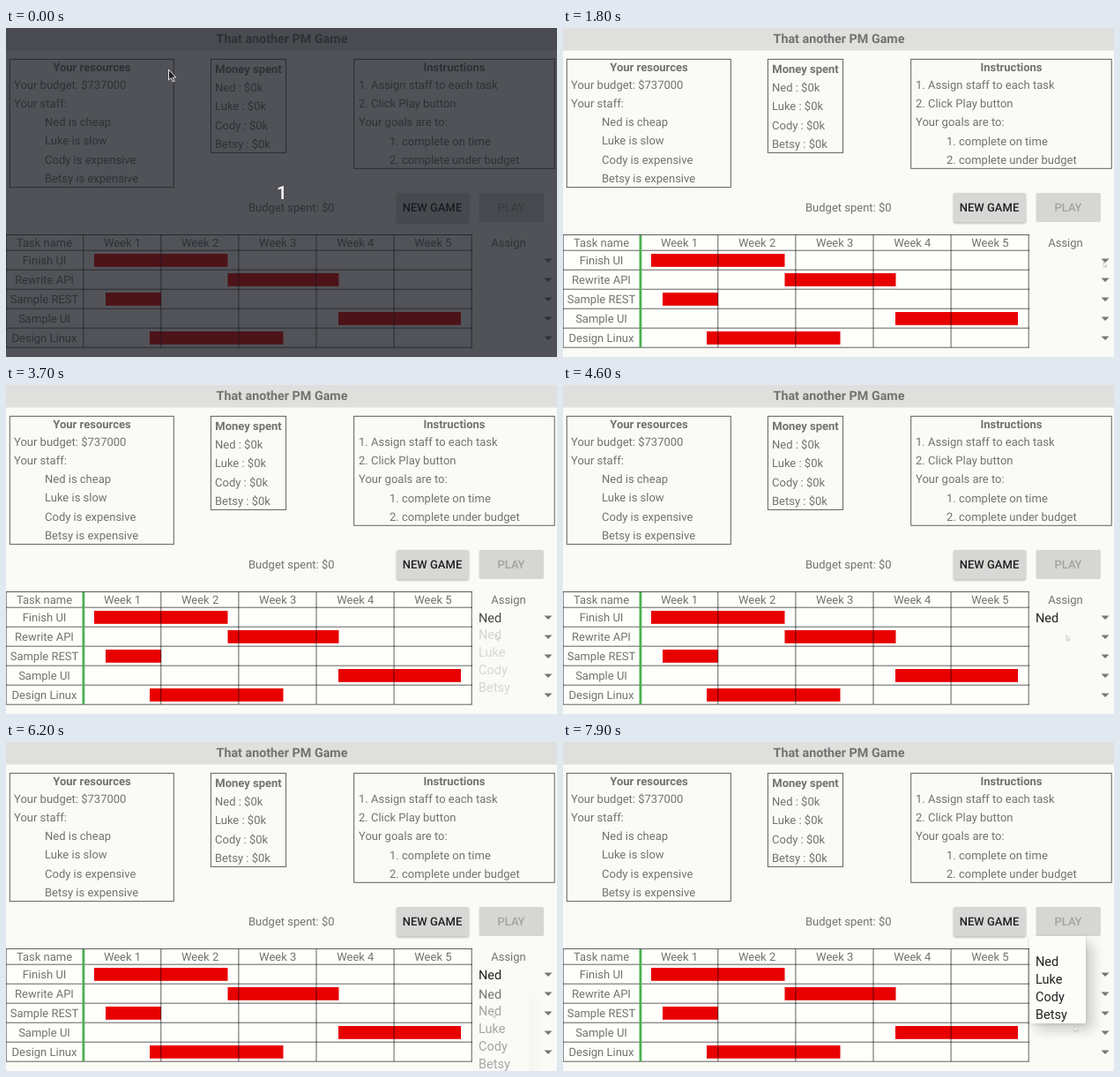
These frames come from a looping animation (625 by 373 pixels, 8000 ms). An HTML page:

```html
<!DOCTYPE html>
<html lang="en">
<head>
<meta charset="utf-8">
<title>PM Game</title>
<style>
html, body { margin: 0; width: 100%; height: 100%; overflow: hidden; background: #fafaf6; }
#stage { position: relative; width: 625px; height: 373px; overflow: hidden; font-family: Roboto, sans-serif; }
svg { position: absolute; left: 0; top: 0; }
text { font-size: 13px; fill: #727270; text-rendering: geometricPrecision; }
.bold { font-weight: 700; }
.title { font-size: 14.3px; font-weight: 700; }
.btn { font-weight: 500; }
.pick { font-size: 14.5px; fill: #212121; }
.line { stroke: rgba(0, 0, 0, .62); fill: none; }
.raised { filter: drop-shadow(0 1px 1px rgba(0, 0, 0, .3)); }
#menu {
  position: absolute; left: 528.5px; width: 64.5px; overflow: hidden; border-radius: 2px;
  background: #fcfcf9;
  box-shadow: 8px 8px 14px rgba(0, 0, 0, calc(.18 * var(--shade))), 0 1px 4px rgba(0, 0, 0, calc(.12 * var(--shade)));
}
#menu div { position: absolute; left: 7.5px; font-size: 14.5px; line-height: 20px; color: #212121; }
#dim { position: absolute; inset: 0; background: rgba(24, 26, 34, .75); }
</style>
</head>
<body>
<div id="stage">
  <svg id="board" width="625" height="373"></svg>
  <div id="menu"></div>
  <div id="dim"></div>
  <svg id="top" width="625" height="373"></svg>
</div>
<script>
const LOOP = 8000;
const NS = 'http://www.w3.org/2000/svg';
const $ = id => document.getElementById(id);
const board = $('board'), menu = $('menu'), dim = $('dim'), topLayer = $('top');

const staff = ['Ned', 'Luke', 'Cody', 'Betsy'];
const traits = ['cheap', 'slow', 'expensive', 'expensive'];
const tasks = [
  ['Finish UI', 100, 251.5],
  ['Rewrite API', 251.5, 377.5],
  ['Sample REST', 113, 176],
  ['Sample UI', 377, 516],
  ['Design Linux', 163, 314.5]
];

function add(parent, tag, attrs, content) {
  const el = document.createElementNS(NS, tag);
  for (const k in attrs) el.setAttribute(k, attrs[k]);
  if (content) el.textContent = content;
  parent.appendChild(el);
  return el;
}
const rect = (x, y, x2, y2, attrs) =>
  add(board, 'rect', { x, y, width: x2 - x, height: y2 - y, ...attrs });
// y is the middle of the capitals
const label = (s, x, y, cls = '', anchor = 'start') =>
  add(board, 'text', { x, y: y + 4.1, class: cls, 'text-anchor': anchor }, s);
const centred = (s, x, y, cls) => label(s, x, y, cls, 'middle');
const line = (x1, y1, x2, y2) => add(board, 'line', { x1, y1, x2, y2, class: 'line' });

function drawPanels() {
  rect(0, 0, 625, 25.5, { fill: '#dfdfdd' });
  centred('That another PM Game', 313, 13.2, 'title');

  rect(4.3, 35.4, 190.3, 180.6, { class: 'line' });
  centred('Your resources', 97.5, 44.8, 'bold');
  label('Your budget: $737000', 9, 64.8);
  label('Your staff:', 9, 85.7);

  rect(232.4, 35.4, 317.6, 141.4, { class: 'line' });
  centred('Money spent', 275, 46.5, 'bold');
  staff.forEach((name, i) => {
    label(`${name} is ${traits[i]}`, 44, 106.8 + i * 21.4);
    label(`${name} : $0k`, 237, 68 + i * 21.3);
  });

  rect(394.7, 35.4, 622.2, 159.3, { class: 'line' });
  centred('Instructions', 508.5, 44.8, 'bold');
  ['1. Assign staff to each task', '2. Click Play button', 'Your goals are to:',
    '1. complete on time', '2. complete under budget']
    .forEach((s, i) => label(s, i < 3 ? 400 : 435, 64.8 + i * 21.2));

  label('Budget spent: $0', 275, 204);
  rect(443, 187, 525, 220.5, { rx: 2, fill: '#d7d7d5', class: 'raised' });
  centred('NEW GAME', 483.5, 204, 'btn').style.fill = '#212121';
  rect(536.5, 187, 610, 220, { rx: 2, fill: '#d6d6d3' });
  centred('PLAY', 573, 204, 'btn').style.fill = '#a2a29f';
}

function drawTable() {
  rect(0, 234.5, 528.5, 362.5, { fill: '#fefefb' });
  tasks.forEach(([, a, b], i) => rect(a, 256 + i * 22, b, 270.8 + i * 22, { fill: '#e80000' }));
  line(0, 234.5, 529, 234.5);
  for (let i = 0; i < 6; i++) line(0, 252.2 + i * 22, 529, 252.2 + i * 22);
  line(.2, 234.5, .2, 362);
  for (let i = 1; i < 7; i++) {
    const x = 87.7 + (i - 1) * 88.1;
    line(x, 234.5, x, 362);
  }
  centred('Task name', 43.5, 244);
  for (let i = 0; i < 5; i++) centred(`Week ${i + 1}`, 132 + i * 88.1, 244);
  centred('Assign', 570, 244);
  tasks.forEach(([name], i) => {
    centred(name, 43.5, 264.2 + i * 22);
    add(board, 'path', { d: `M610.5 ${261.5 + i * 22}h9l-4.5 4.5z`, fill: '#757573' });
  });
}

drawPanels();
drawTable();
const progress = rect(86.5, 235, 89.3, 362, { fill: '#4caf50' });
const picks = [0, 1].map(i => label(staff[0], 536, 264.6 + i * 22, 'pick'));
const pickTimes = [3550, 6110];

const items = staff.map((name, i) => {
  const el = document.createElement('div');
  el.textContent = name;
  el.style.top = 20.5 + i * 20 + 'px';
  menu.appendChild(el);
  return el;
});

const count = add(topLayer, 'text', { x: 313, y: 194, 'text-anchor': 'middle' }, '1');
count.style.cssText = 'font-size:21px;font-weight:500;fill:#fff';
const arrow = 'M0 0V12L2.8 9.6 4.8 14 6.6 13.2 4.7 9H8.2Z';
const pointer = add(topLayer, 'path', { d: arrow });

// [top, opens, starts to close, closed]
const menus = [
  [253.5, 2450, 3500, 3740],
  [275.5, 4820, 6060, 6290],
  [219.5, 7360, 9000, 9000]
];

// [time, x, y]
const path = [
  [500, 190, 45], [800, 402, 167], [900, 402, 167], [1200, 534, 236], [1300, 534, 236],
  [1800, 613, 265], [2700, 613, 265], [3100, 556, 283], [4500, 556, 283], [4800, 613, 286],
  [4950, 613, 287], [5100, 584, 298], [5400, 552, 306], [6400, 552, 306], [6550, 541, 308],
  [6750, 580, 336], [7000, 614, 327], [7600, 614, 327], [7900, 580, 322]
];

const clamp = v => Math.min(1, Math.max(0, v));
const smooth = v => v * v * (3 - 2 * v);

function pointAt(t) {
  let i = path.findIndex(p => p[0] > t);
  if (i < 0) return path[path.length - 1].slice(1);
  if (i === 0) return path[0].slice(1);
  const [t0, x0, y0] = path[i - 1], [t1, x1, y1] = path[i];
  const k = smooth((t - t0) / (t1 - t0));
  return [x0 + (x1 - x0) * k, y0 + (y1 - y0) * k];
}

function drawMenu(t) {
  const m = menus.find(m => t >= m[1] && t < m[3]);
  menu.style.display = m ? 'block' : 'none';
  if (!m) return;
  const [y, open, close, end] = m;
  const p = (t - open) / 250;
  const fade = end > close ? clamp((end - t) / (end - close)) : 1;
  menu.style.top = y + 'px';
  menu.style.height = 30 + 69.5 * smooth(clamp((p - .25) / .35)) + 'px';
  menu.style.opacity = Math.min(clamp(p * 4), fade);
  menu.style.setProperty('--shade', fade);
  items.forEach((el, i) => el.style.opacity = clamp((p - .4 - i * .1) / .25));
}

function draw(t) {
  const waiting = t < 500;
  dim.style.display = waiting ? 'block' : 'none';
  count.style.display = waiting ? 'block' : 'none';
  progress.style.display = waiting ? 'none' : 'block';
  picks.forEach((el, i) => el.style.display = t >= pickTimes[i] ? 'block' : 'none');
  drawMenu(t);
  const [x, y] = waiting ? [184.5, 47] : pointAt(t);
  pointer.setAttribute('transform', `translate(${x} ${y}) scale(${waiting ? 1 : .5})`);
  pointer.setAttribute('fill', waiting ? '#1c1d20' : '#fff');
  pointer.setAttribute('stroke', waiting ? '#e8e8e8' : '#b4b4b2');
  pointer.setAttribute('stroke-width', waiting ? 1 : 1.3);
}

const start = performance.now();
function tick() {
  draw((performance.now() - start) % LOOP);
  requestAnimationFrame(tick);
}
tick();
</script>
</body>
</html>
```
